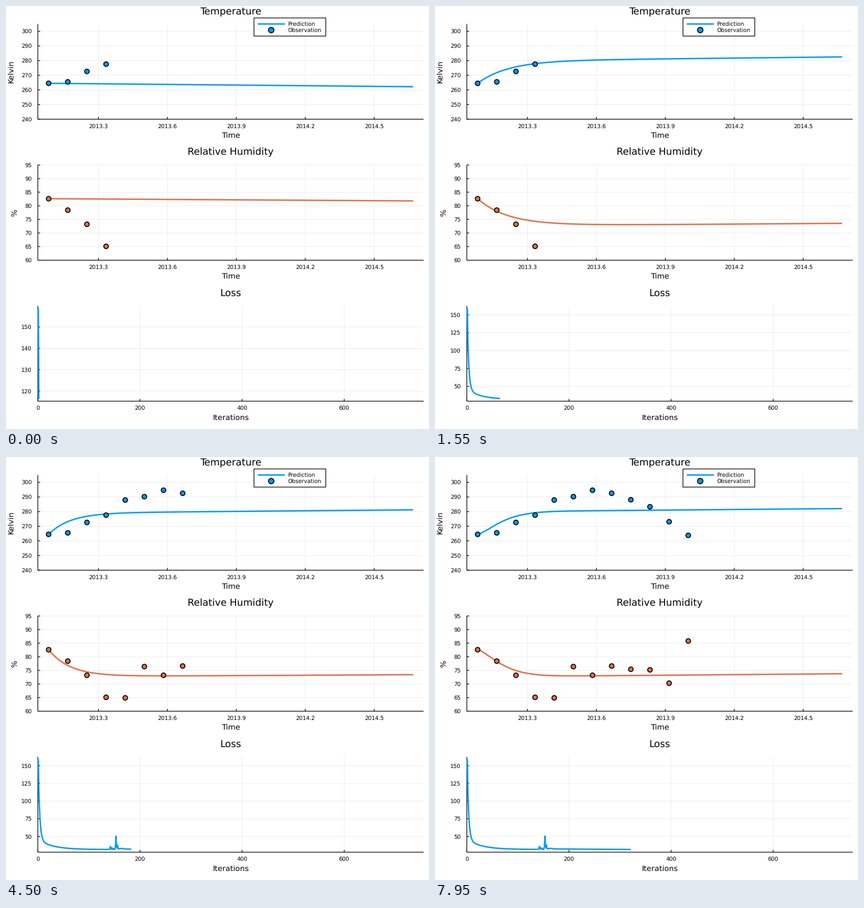
Animation, 748 px wide and 748 px high, one loop 8000 ms. Source, as a matplotlib script:

```python
import numpy as np
import matplotlib.pyplot as plt
from matplotlib.animation import FuncAnimation
from matplotlib.collections import LineCollection
from matplotlib.patches import Circle, Rectangle

plt.rcParams["font.family"] = "DejaVu Sans"
plt.rcParams["text.hinting"] = "none"
plt.rcParams["path.snap"] = False

SIZE, DPI = 748, 88
PX = 72 / DPI                       # points per pixel
FRAMES, INTERVAL = 160, 50
LEFT, RIGHT, HEIGHT = 56.3, 738.5, 168.4
BOTTOMS = [200.2 + 249.3 * i for i in range(3)]
RANGE_T, RANGE_H = (240, 305), (60, 95)
BLUE, ORANGE, GRID = "#009afa", "#e36f47", "#e6e6e6"

fig = plt.figure(figsize=(SIZE / DPI, SIZE / DPI), dpi=DPI, facecolor="white")
ax = fig.add_axes([0, 0, 1, 1])
ax.set(xlim=(0, SIZE), ylim=(SIZE, 0))
ax.axis("off")


def label(x, y, text, size=8, ha="center", rotation=0):
    return ax.text(x, y, text, fontsize=size, ha=ha, va="baseline", color="black",
                   rotation=rotation, rotation_mode="anchor", zorder=6)


def segments(lines, color, width, z):
    part = LineCollection(lines, colors=color, linewidths=width * PX, zorder=z)
    ax.add_collection(part, autolim=False)
    return part


def grid(lines):
    return segments(lines, GRID, 0.7, 1)


def ticks(lines):
    return segments(lines, "black", 1.2, 2)


def across(ys, end):
    return [[(LEFT, y), (end, y)] for y in ys]


def to_y(values, limits, bottom):
    low, high = limits
    return bottom - (np.asarray(values) - low) / (high - low) * HEIGHT


def panel(bottom, title, xname, xticks):
    top = bottom - HEIGHT
    grid([[(x, top), (x, bottom)] for x, _ in xticks])
    ticks([[(x, bottom), (x, bottom - 4)] for x, _ in xticks])
    ticks([[(LEFT, top), (LEFT, bottom)], [(LEFT, bottom), (RIGHT, bottom)]])
    for x, text in xticks:
        label(x, bottom + 15.2, text)
    mid = (LEFT + RIGHT) / 2
    label(mid, top - 17.2, title, 14)
    label(mid, bottom + 33.6, xname, 11)


def fixed_y_axis(bottom, limits, values):
    ys = to_y(values, limits, bottom)
    grid(across(ys, RIGHT))
    ticks(across(ys, LEFT + 4))
    for v, y in zip(values, ys):
        label(45.4, y + 3.5, str(v), ha="right")


def stroke(color, bottom):
    line, = ax.plot([], [], color=color, lw=2.5 * PX, zorder=3,
                    solid_capstyle="round", solid_joinstyle="round")
    line.set_clip_path(Rectangle((LEFT - 0.3, bottom - HEIGHT), RIGHT - LEFT + 0.3,
                                 HEIGHT, transform=ax.transData))
    return line


def dot(x, y, color, radius=4.1, z=4):
    return ax.add_patch(Circle((x, y), radius, fc=color, ec="black",
                               lw=1.6 * PX, zorder=z))


# static parts
years = [(163.5 + 121.9 * i, f"{2013.3 + 0.3 * i:.1f}") for i in range(5)]
counts = [(LEFT + 180.6 * i, str(200 * i)) for i in range(4)]
panel(BOTTOMS[0], "Temperature", "Time", years)
panel(BOTTOMS[1], "Relative Humidity", "Time", years)
panel(BOTTOMS[2], "Loss", "Iterations", counts)
fixed_y_axis(BOTTOMS[0], RANGE_T, range(240, 301, 10))
fixed_y_axis(BOTTOMS[1], RANGE_H, range(60, 96, 5))
label(13.2, 116, "Kelvin", 11, rotation=90)
label(19.4, 365.3, "%", 11, rotation=90)

# legend
ax.add_patch(Rectangle((438.5, 21.1), 127, 32.1, fc="white", ec="black",
                       lw=1.2 * PX, zorder=5))
ax.plot([446.5, 492], [31.8, 31.8], color=BLUE, lw=2.5 * PX, zorder=6)
dot(469, 42.6, BLUE, 4.8, 6)
label(498.5, 35.2, "Prediction", ha="left")
label(498.5, 46.0, "Observation", ha="left")

# monthly observations
START, STEP, END = 75.4, 33.86, 719.0
KELVIN = [264.5, 265.5, 272.6, 277.6, 287.9, 290.2, 294.6, 292.5, 288.1, 283.3, 273.1, 263.8]
HUMID = [82.6, 78.4, 73.2, 65.1, 64.9, 76.4, 73.2, 76.6, 75.4, 75.2, 70.3, 85.8]
obs_t = to_y(KELVIN, RANGE_T, BOTTOMS[0])
obs_h = to_y(HUMID, RANGE_H, BOTTOMS[1])
pairs = [(dot(START + STEP * i, t, BLUE), dot(START + STEP * i, h, ORANGE))
         for i, (t, h) in enumerate(zip(obs_t, obs_h))]

# each fit is an exponential approach to a level plus a slow trend
POSES = [0, 16, 31, 58, 90, 114, 159]
LEVEL_T, TREND_T = [45, 45, 39.7, 40.2, 37.7, 38.9, 40], [-6, 5, 7, 0, 5.5, 7.3, 5.5]
LEVEL_H, TREND_H = [50, 50, 48, 47.2, 47.6, 47.3, 47.9], [3.9, -1.2, -4.4, -1.5, -3.4, -4.9, -5.4]
U = np.linspace(0, 1, 240)
CURVE_X = START + (END - START) * U


def fitted(k, levels, trends, bend):
    late = np.clip((k - 114) / 45, 0, 1)
    tau = 0.059 + 0.27 * np.exp(-k / 13) + 0.019 * late
    rise = 1 - np.exp(-(U / tau) ** (1 + 0.4 * late))
    level = np.interp(k, POSES, levels) * (1 - np.exp(-k / 1.5))
    bend *= np.exp(-((k - 64) / 12) ** 2)
    return level * rise + np.interp(k, POSES, trends) * U + bend * U ** 2


def training_loss(n):
    decay = 145 * np.exp(-n / 2.75) + 110 * np.exp(-2.2 * n) + 14.5 * np.exp(-n / 28)
    shift = np.where(n > 150, 0.8 - 0.005 * (n - 150), 0)
    swell = 0.8 * np.exp(-((n - 165) / 4) ** 2)
    spikes = sum(h * np.maximum(0, 1 - abs(n - c) / 1.3)
                 for c, h in [(142, 4.2), (145, 2.4), (148, 1.2), (153, 18), (156, 5.2)])
    return 31.6 + decay + shift + swell + spikes


ITER = np.arange(1, 2 * FRAMES + 1)
LOSS = training_loss(ITER)

line_t, line_h = stroke(BLUE, BOTTOMS[0]), stroke(ORANGE, BOTTOMS[1])
line_loss = stroke(BLUE, BOTTOMS[2])
loss_grid, loss_ticks = grid([]), ticks([])
loss_labels = [label(45.4, 0, "", ha="right") for _ in range(7)]


def draw_loss(n):
    data = LOSS[:n]
    pad = 0.03 * np.ptp(data)
    limits = low, high = data.min() - pad, data.max() + pad
    line_loss.set_data(LEFT + 0.903 * ITER[:n], to_y(data, limits, BOTTOMS[2]))

    extent = high - low
    step = 10 if extent < 60 else 20 if extent < 107 else 25
    values = np.arange(np.ceil(low / step) * step, high, step)
    ys = to_y(values, limits, BOTTOMS[2])
    loss_grid.set_segments(across(ys, RIGHT))
    loss_ticks.set_segments(across(ys, LEFT + 4))
    for text in loss_labels:
        text.set_text("")
    for text, v, y in zip(loss_labels, values, ys):
        text.set_text(f"{v:.0f}")
        text.set_y(y + 3.5)


def update(k):
    n = 2 + 2 * k
    seen = 4 * (1 + (n - 1) // 150)     # four more months every 150 iterations
    line_t.set_data(CURVE_X, obs_t[0] - fitted(k, LEVEL_T, TREND_T, 9))
    line_h.set_data(CURVE_X, obs_h[0] + fitted(k, LEVEL_H, TREND_H, -5))
    for i, pair in enumerate(pairs):
        for mark in pair:
            mark.set_visible(i < seen)
    draw_loss(n)
    return []


anim = FuncAnimation(fig, update, frames=FRAMES, interval=INTERVAL,
                     init_func=lambda: update(0), repeat=True, repeat_delay=0)
plt.show()
```
